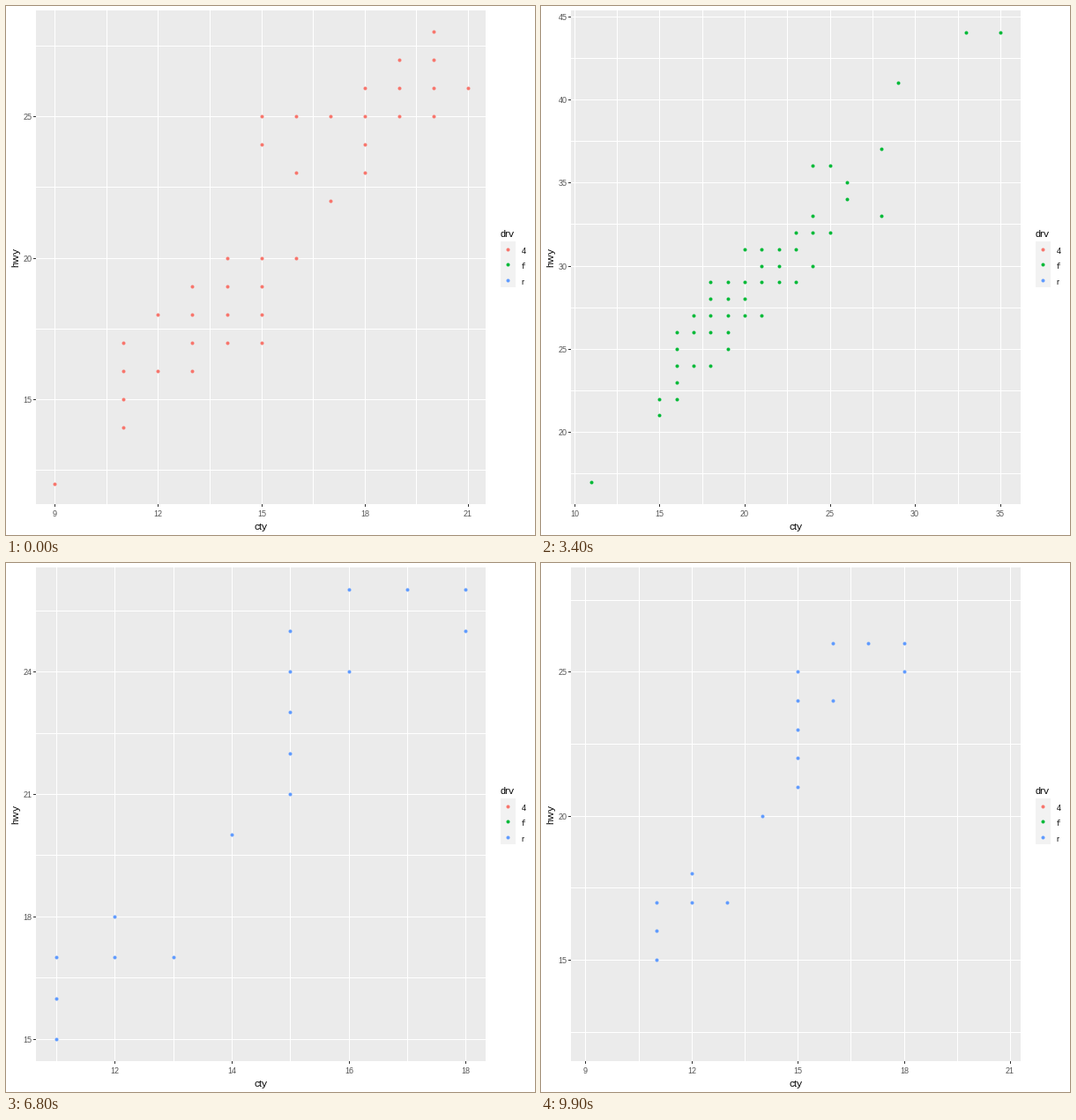
A matplotlib script that plays this animation: 600 px wide and 600 px high, repeating every 10 s.

```python
import math
from itertools import product

import matplotlib.pyplot as plt
from matplotlib.animation import FuncAnimation
from matplotlib.patches import Rectangle

SIZE, DPI = 600, 100
PX = 72 / DPI  # points per pixel
FRAMES, INTERVAL = 100, 100
STEPS = 12
LEFT, WIDTH, TOP, HEIGHT = 33.7, 510.7, 4.9, 560.5

plt.rcParams["font.family"] = "Liberation Sans"
plt.rcParams["text.hinting"] = "default"
plt.rcParams["text.hinting_factor"] = 1

# cty -> hwy values, one table per drive type
FOUR = {9: [12], 11: range(14, 18), 12: [16, 18], 13: range(16, 20),
        14: range(17, 21), 15: [17, 18, 19, 20, 24, 25], 16: [20, 23, 25],
        17: [22, 25], 18: range(23, 27), 19: range(25, 28),
        20: range(25, 29), 21: [26]}
FRONT = {11: [17], 15: [21, 22], 16: range(22, 27), 17: [24, 26, 27],
         18: [24, 26, 27, 28, 29], 19: range(25, 30), 20: [27, 28, 29, 31],
         21: [27, 29, 30, 31], 22: [29, 30, 31], 23: [29, 31, 32],
         24: [30, 32, 33, 36], 25: [32, 36], 26: [34, 35], 28: [33, 37],
         29: [41], 33: [44], 35: [44]}
REAR = {11: [15, 16, 17], 12: [17, 18], 13: [17], 14: [20],
        15: range(21, 26), 16: [24, 26], 17: [26], 18: [25, 26]}
POINTS = [[(x, y) for x, ys in table.items() for y in ys]
          for table in (FOUR, FRONT, REAR)]
COLORS = ["#F8766D", "#00BA38", "#619CFF"]
NAMES = ["4", "f", "r"]
DATA_START = [0, 33, 67]   # first frame of each group's points
ZOOM_START = [22, 56, 89]  # last resting frame before each zoom


def padded(values):
    """Centre and span of the values with 5% added on each side."""
    lo, hi = min(values), max(values)
    return (lo + hi) / 2, (hi - lo) * 1.1


VIEWS = [[padded(axis) for axis in zip(*pts)] for pts in POINTS]


def zoom(start, end, e):
    """Geometric zoom; the centre travels with the square of the span."""
    (c0, w0), (c1, w1) = start, end
    w = w0 * (w1 / w0) ** e
    c = c0 + (c1 - c0) * (w * w - w0 * w0) / (w1 * w1 - w0 * w0)
    return c - w / 2, c + w / 2


def view_at(frame):
    """Ranges of both axes: rest, then a sine-eased zoom to the next group."""
    if frame == 0:
        frame = FRAMES
    state = next(i for i, start in enumerate(ZOOM_START) if frame <= start + STEPS)
    t = max(frame - ZOOM_START[state], 0) / STEPS
    e = (1 - math.cos(math.pi * t)) / 2
    return [zoom(a, b, e) for a, b in zip(VIEWS[state], VIEWS[(state + 1) % 3])]


def breaks(lo, hi, target=5):
    """Major and minor breaks, the step chosen by simplicity, coverage and density."""
    best, step = -math.inf, 1
    span = hi - lo
    for (i, q), power in product(enumerate((1, 5, 2, 2.5, 4, 3)), (0.1, 1, 10)):
        s = q * power
        first, last = math.floor(lo / s), math.floor(hi / s)
        for a, b in product((first, first + 1), (last, last + 1)):
            if b <= a:
                continue
            bottom, top = a * s, b * s
            simple = -i / 5 + (bottom <= 0 <= top)
            cover = 1 - 0.5 * ((hi - top) ** 2 + (lo - bottom) ** 2) / (0.1 * span) ** 2
            ratio = (max(top, hi) - min(bottom, lo)) / (s * (target - 1))
            dense = 2 - max(ratio, 1 / ratio)
            score = 0.25 * simple + 0.2 * cover + 0.5 * dense
            if score > best + 1e-9:
                best, step = score, s
    ticks = [k * step for k in range(math.floor(lo / step), math.ceil(hi / step) + 1)]
    major = [v for v in ticks if lo <= v <= hi]
    minor = [v + step / 2 for v in ticks if lo <= v + step / 2 <= hi]
    return major, minor


# Whole coordinates are pixel centres.
fig = plt.figure(figsize=(SIZE / DPI, SIZE / DPI), dpi=DPI, facecolor="white")
ax = fig.add_axes([0, 0, 1, 1])
ax.set_xlim(-0.5, SIZE - 0.5)
ax.set_ylim(SIZE - 0.5, -0.5)
ax.axis("off")


def box(x, y, w, h, color):
    return ax.add_patch(Rectangle((x, y), w, h, facecolor=color, linewidth=0))


def write(x, y, text, size, color="black", **kw):
    return ax.text(x, y, text, fontsize=size * PX, color=color, va="baseline", **kw)


def line(xs, ys, color):
    item, = ax.plot(xs, ys, color=color, lw=PX, zorder=2, snap=False,
                    solid_capstyle="butt")
    return item


def dots(xs, ys, color):
    """Four-pixel dots centred on pixel corners."""
    item, = ax.plot([x - 0.5 for x in xs], [y - 0.5 for y in ys], "o",
                    color=color, ms=4 * PX, mew=0, zorder=5)
    return item


panel = box(33.5, 4.5, 510, 560, "#EBEBEB")
write(288.5, 593, "cty", 11, ha="center")
write(14, 284.5, "hwy", 11, ha="center", rotation=90, rotation_mode="anchor")
write(560, 262, "drv", 11)
box(560.5, 266.5, 17, 52, "#F2F2F2")
for name, color, y in zip(NAMES, COLORS, (276, 293, 311)):
    dots([569], [y], color)
    write(584, y + 4.5, name, 9)

moving = []


def to_x(v, lo, hi):
    return round(LEFT + (v - lo) / (hi - lo) * WIDTH)


def to_y(v, lo, hi):
    return round(TOP + (hi - v) / (hi - lo) * HEIGHT)


def labels(values):
    digits = 0 if all(v == int(v) for v in values) else 1
    return [f"{v:.{digits}f}" for v in values]


def update(frame):
    while moving:
        moving.pop().remove()
    xr, yr = view_at(frame)
    (x_major, x_minor), (y_major, y_minor) = breaks(*xr), breaks(*yr)

    for v in x_minor + x_major:
        x = to_x(v, *xr)
        moving.append(line([x, x], [4.5, 564.5], "white"))
    for v in y_minor + y_major:
        y = to_y(v, *yr)
        moving.append(line([33.5, 543.5], [y, y], "white"))

    for v, text in zip(x_major, labels(x_major)):
        x = to_x(v, *xr)
        moving.append(line([x, x], [564.5, 567.5], "#333333"))
        moving.append(write(x - 0.5, 578.5, text, 9, "#4D4D4D", ha="center"))
    for v, text in zip(y_major, labels(y_major)):
        y = to_y(v, *yr)
        moving.append(line([30.5, 33.5], [y, y], "#333333"))
        moving.append(write(29, y + 3.5, text, 9, "#4D4D4D", ha="right"))

    state = max(i for i, start in enumerate(DATA_START) if frame >= start)
    cloud = dots([to_x(x, *xr) for x, _ in POINTS[state]],
                 [to_y(y, *yr) for _, y in POINTS[state]], COLORS[state])
    cloud.set_clip_path(panel)
    moving.append(cloud)
    return moving


anim = FuncAnimation(fig, update, frames=FRAMES, interval=INTERVAL,
                     repeat=True, repeat_delay=0, blit=False)
plt.show()
```
